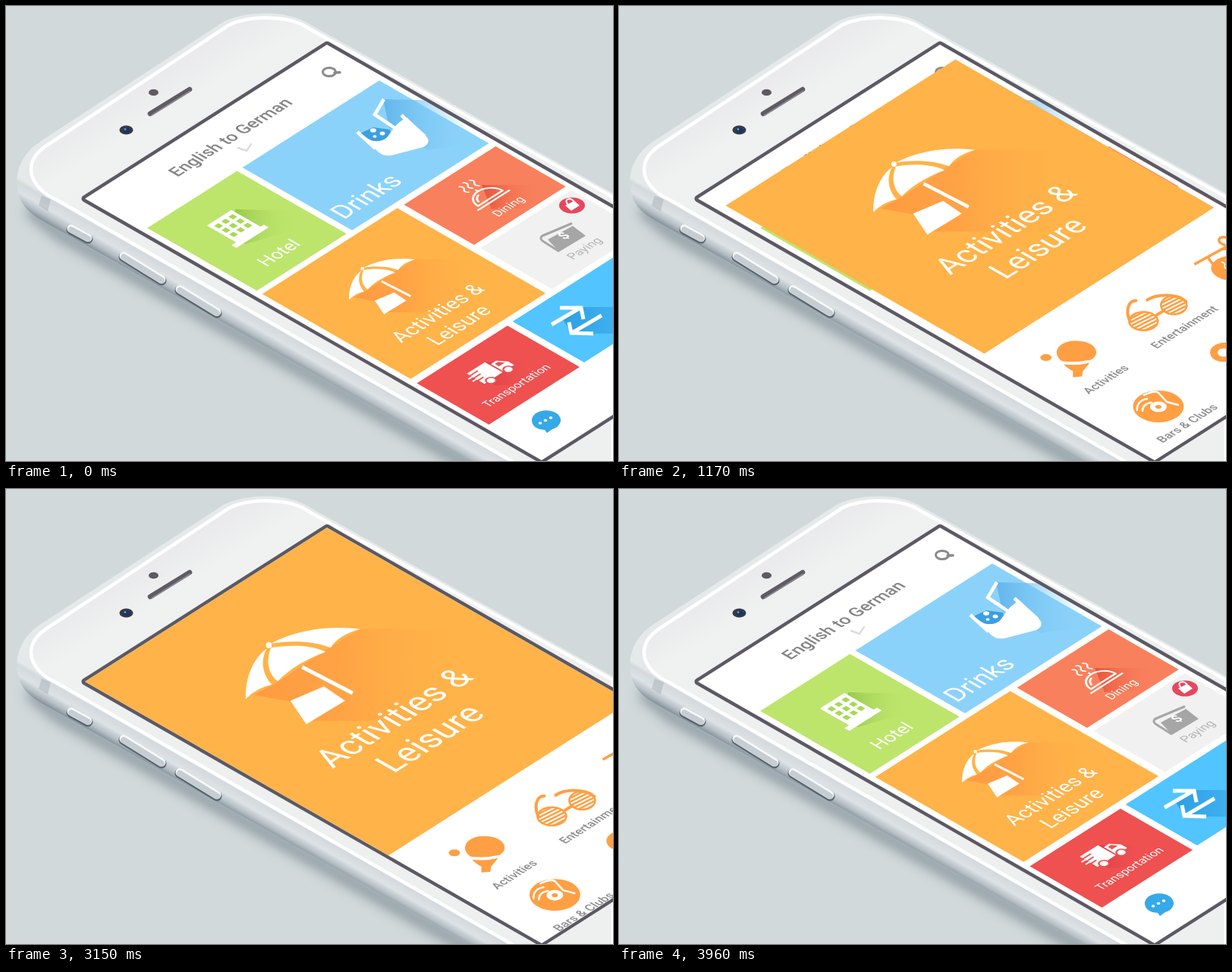
Recreate the animation shown at these times as an HTML page. Size 800 by 600 pixels, loop 4200 ms.

```html
<!DOCTYPE html>
<html lang="en">
<head>
<meta charset="utf-8">
<title>Travel phrasebook</title>
<style>
html, body { margin: 0; width: 100%; height: 100%; overflow: hidden; background: #d1d9da; }
svg { display: block; width: 800px; height: 600px; font-family: Roboto, sans-serif; }
.mid { text-anchor: middle; }
.line { fill: none; stroke-linecap: round; stroke-linejoin: round; }
.cut { fill: none; stroke-linecap: butt; stroke-linejoin: miter; }
.white { fill: #fff; }
.ink { stroke: #fff; }
.amber { fill: #ff9f43; }
.amberLine { stroke: #ff9f43; }
.label { fill: #8c8c8c; font-size: 15.2px; font-weight: 500; }
</style>
</head>
<body>
<svg viewBox="0 0 800 600">
<defs>
  <linearGradient id="side" gradientUnits="userSpaceOnUse" x1="253" y1="399" x2="269" y2="371">
    <stop offset="0" stop-color="#8a969e"/><stop offset=".2" stop-color="#b4bec4"/>
    <stop offset=".5" stop-color="#dde2e5"/><stop offset=".85" stop-color="#d3d9dc"/>
    <stop offset="1" stop-color="#e6e9ea"/>
  </linearGradient>
  <linearGradient id="face" gradientUnits="userSpaceOnUse" x1="180" y1="90" x2="260" y2="220">
    <stop offset="0" stop-color="#e9e9eb"/><stop offset=".4" stop-color="#f0f1f1"/><stop offset="1" stop-color="#eeefef"/>
  </linearGradient>
  <linearGradient id="blueShade"><stop offset="0" stop-color="#62b5ec"/><stop offset="1" stop-color="#8bd2fa" stop-opacity="0"/></linearGradient>
  <linearGradient id="greenShade"><stop offset="0" stop-color="#95c94a"/><stop offset="1" stop-color="#bde56c" stop-opacity="0"/></linearGradient>
  <linearGradient id="redShade"><stop offset="0" stop-color="#e5533d"/><stop offset="1" stop-color="#f9805c" stop-opacity="0"/></linearGradient>
  <linearGradient id="crimsonShade"><stop offset="0" stop-color="#d23c40"/><stop offset="1" stop-color="#ef5050" stop-opacity="0"/></linearGradient>
  <linearGradient id="skyShade"><stop offset="0" stop-color="#2d9fe2"/><stop offset="1" stop-color="#3eb0f0"/></linearGradient>
  <linearGradient id="amberShade"><stop offset="0" stop-color="#ff9a42"/><stop offset=".4" stop-color="#ffa345"/><stop offset="1" stop-color="#ffb348" stop-opacity="0"/></linearGradient>
  <filter id="soft" x="-20%" y="-20%" width="140%" height="140%"><feGaussianBlur stdDeviation="8"/></filter>
  <clipPath id="screen"><path id="glass"/></clipPath>
  <clipPath id="lenses"><ellipse cx="671" cy="404" rx="20" ry="13"/><ellipse cx="711" cy="383" rx="18" ry="13"/></clipPath>
</defs>

<rect width="800" height="600" fill="#d1d9da"/>

<!-- phone -->
<path d="M36 272L70 300 640 622" class="line" stroke="#75848d" stroke-width="18" opacity=".7" filter="url(#soft)"/>
<path d="M800 247L400 24C375 7 325 4 288 20L46 178C17 197 11 224 16 246C20 266 36 277 62 291L800 706Z" fill="url(#side)"/>
<path d="M800 252L398 29C375 13 325 11 294 25L55 183C28 200 27 224 46 242Q54 250 64 254L800 677Z" fill="url(#face)" stroke="#fff" stroke-width="4.500"/>
<path d="M47 250l12 5-4 16-12-8z" fill="#aab2b7" opacity=".5"/>
<g id="buttons" class="line"></g>
<ellipse cx="194.500" cy="114" rx="6.500" ry="4.300" fill="#5e5962"/>
<path d="M190 142L242 110" class="line" stroke="#5f5b64" stroke-width="6.500"/>
<path d="M192 144L243 112" class="line" stroke="#8d8990" stroke-width="1.500"/>
<ellipse cx="158.500" cy="163.500" rx="9" ry="6" fill="#383a45"/>
<ellipse cx="159" cy="164" rx="5" ry="3.500" fill="#18375f"/>
<circle cx="157" cy="162.500" r="1.300" fill="#7aa9d6"/>
<path id="frame" fill="#fff" stroke="#5c5964" stroke-width="9" stroke-linejoin="round"/>

<g clip-path="url(#screen)">
  <rect width="800" height="600" fill="#fff"/>

  <!-- home -->
  <g data-plane>
    <g id="tiles"></g>
    <text x="185.500" y="45.500" class="mid" font-size="22" font-weight="500" fill="#858585">English to German</text>
  </g>
  <g class="line" stroke="#8a8a8a" stroke-width="3">
    <ellipse cx="426" cy="87" rx="8.500" ry="5.500"/><path d="M433 88l7-.5" stroke-width="3.500"/>
    <path d="M306 187l11 4 6-9" stroke="#dcdcdc" stroke-width="2.500"/>
  </g>

  <path d="M497 123L585 125 618 180 556 190 505 160Z" fill="url(#blueShade)"/>
  <path d="M467 168L484 160 506 163 508 172 496 178 482 178Z" fill="#3c9fe2"/>
  <path d="M474 173Q484 181 496 177C507 174 507 158 528 147L555 173Q560 181 550 186L508 197Q496 199 488 190Z" class="white"/>
  <path d="M463 166L487 188M498 123L486 143 514 162M521 144L552 172" class="cut ink" stroke-width="4.500"/>
  <g class="white"><ellipse cx="484" cy="164" rx="4" ry="2.800"/><ellipse cx="496" cy="168" rx="3.500" ry="2.500"/><ellipse cx="486" cy="172" rx="2.500" ry="1.800"/></g>

  <path d="M302 268L372 270 385 294 315 314 300 300Z" fill="url(#greenShade)"/>
  <path d="M627 236L705 236 690 266 640 268Z" fill="url(#redShade)"/>
  <path d="M634 470L680 470 690 498 645 500 625 490Z" fill="url(#crimsonShade)"/>
  <path d="M758 397L800 397 800 432 746 432 733 412Z" fill="url(#skyShade)"/>

  <g data-plane>
    <g class="white">
      <path d="M55 127h38v43h5v7H48v-7h7z"/>
      <g id="windows" fill="#a9d858"></g>
      <path d="M56 508h28v26H56zM86 515h8l8 10v9H86z"/>
      <path d="M89 518h5l4 6h-9z" fill="#ef5050"/>
      <path d="M54 513h13M54 519h11M54 525h9" class="line" stroke="#ef5050" stroke-width="2"/>
      <g stroke="#ef5050" stroke-width="2"><circle cx="65" cy="535" r="5.500"/><circle cx="92" cy="535" r="5.500"/></g>
      <path d="M51 516h8M51 522h8" class="line ink" stroke-width="2"/>
    </g>
    <g class="line ink" stroke-width="2.400">
      <path d="M274 318h48M279 313a19 18 0 0 1 38 0zM298 294v-2M285 308q2-6 8-8"/>
      <path d="M290 289q-4-4 0-7t0-7M298 287q-4-4 0-7t0-7M306 289q-4-4 0-7t0-7" stroke-width="2"/>
    </g>
    <g class="white">
      <text x="163" y="226" font-size="33">Drinks</text>
      <g class="mid">
        <text x="73" y="223.500" font-size="23">Hotel</text>
        <text x="301" y="342" font-size="15.200">Dining</text>
        <text x="77" y="566" font-size="15">Transportation</text>
      </g>
    </g>
    <text x="303" y="452" class="mid" font-size="15.600" fill="#b3b3b3">Paying</text>
  </g>

  <path d="M714 308L747 290 764 303 729 324Z" fill="#a6a6a6"/>
  <path d="M745 287L707 303Q702 307 709 311L728 323" class="line" stroke="#a6a6a6" stroke-width="3"/>
  <g data-plane><text x="304" y="421" class="mid white" font-size="17" font-weight="700">$</text></g>
  <ellipse cx="746" cy="263" rx="17" ry="10.500" fill="#e8465e"/>
  <path d="M737 263L749 257 756 263 745 270Z" class="white"/>
  <path d="M740 261C735 255 743 252 748 257" class="line ink" stroke-width="2"/>
  <path d="M719 420L757 398M730 398L758 398 761 413M785 408L746 431M774 432L745 431 742 417" class="cut ink" stroke-width="5"/>
  <path d="M693 547a19 13 0 1 1 27 11l-7 5-3-4q-16-1-17-12z" fill="#36a9e8"/>
  <g class="white"><ellipse cx="704" cy="550" rx="2.300" ry="1.700"/><ellipse cx="711" cy="546.500" rx="2.300" ry="1.700"/><ellipse cx="718" cy="543" rx="2.300" ry="1.700"/></g>

  <!-- category panel -->
  <g data-plane><rect id="panel" width="375" height="667" fill="#fff"/></g>
  <g id="row1">
    <ellipse cx="542.500" cy="452" rx="7.500" ry="4.500" class="amber"/>
    <path d="M564 457C550 448 556 431 580 430C606 429 617 446 602 455Q583 459 564 457Z" class="amber"/>
    <path d="M566 461Q584 463 600 459Q594 467 591 470L590 477 578 478 578 470Q570 466 566 461Z" class="amber"/>
    <g clip-path="url(#lenses)">
      <rect x="640" y="360" width="100" height="70" class="amber"/>
      <path id="slats" class="ink" stroke-width="2"/>
    </g>
    <path d="M653 404C647 390 651 377 661 377M727 378C715 367 688 368 676 376M688 396L698 390" class="line amberLine" stroke-width="4"/>
    <g class="line amberLine" stroke-width="2.500"><ellipse cx="671" cy="404" rx="19" ry="12"/><ellipse cx="711" cy="383" rx="17" ry="12"/></g>
    <path d="M738 329L800 295M756 320l7 10M775 309q8-2 8 6M779 304q-12-4-7-10 9-3 13 4M786 303q12-8 5-12" class="cut amberLine" stroke-width="3.500"/>
    <ellipse cx="791" cy="334" rx="31" ry="17" class="amber"/>
    <path d="M774 326q5 1 4 5t5 4M780 323q5 1 4 5t5 4M787 320q5 1 4 5t5 4" class="line ink" stroke-width="1.700"/>
    <g class="label"><text data-at="626 483.500" class="mid">Activities</text><text data-at="729.500 414.500" class="mid">Entertainment</text><text data-at="790 375.500">Restaurants</text></g>
  </g>
  <g id="row2">
    <ellipse cx="683" cy="512" rx="33.500" ry="21" class="amber"/>
    <path d="M655 517C654 509 660 503 668 502M662 518C662 512 666 508 674 507M664 497C675 492 680 492 683 494L694 506 709 510" class="line ink" stroke-width="2.500"/>
    <ellipse cx="683" cy="512.500" rx="11" ry="7" class="white"/><ellipse cx="683" cy="512.500" rx="4" ry="2.600" class="amber"/>
    <path d="M751 441C752 427 776 425 785 431Q792 430 800 426V462H788Q788 452 778 452C762 456 752 450 751 441Z" class="amber"/>
    <ellipse cx="769" cy="441" rx="8" ry="5.500" class="white"/>
    <path d="M789 420q6-3 8 1t6 0M794 426q5-2 6 1" class="line amberLine" stroke-width="2"/>
    <g class="label"><text data-at="725.500 537" class="mid">Bars &amp; Clubs</text><text data-at="791 493.500">Beaches</text></g>
  </g>

  <!-- expanding card -->
  <g data-plane><rect id="card" fill="#ffb348"/></g>
  <g id="umbrella">
    <path d="M330 262L359 247 420 206 457 184H592V293H392L374 270Z" fill="url(#amberShade)"/>
    <g class="white">
      <path d="M321 267C320 240 331 218 346 207C338 222 341 238 352 250Q335 253 321 267Z"/>
      <path d="M351 206C345 222 347 236 359 246C372 232 392 220 416 211C400 203 375 202 351 206Z"/>
      <path d="M351 201C385 183 425 180 457 184Q431 191 422 206C402 198 375 197 351 201Z"/>
      <circle cx="348.500" cy="203" r="3.500"/>
      <path d="M374 269L414 252 439 269 393 297Z"/>
    </g>
    <path d="M388 229L448 260" class="cut ink" stroke-width="4.500"/>
  </g>
  <g id="title" class="white mid" font-size="26.300">
    <text x="3">Activities &amp;</text><text x="3" y="31.500">Leisure</text>
  </g>
  <path id="close" d="M-13.500 0H13.500M0-9V9" class="cut ink" stroke-width="4.500"/>
</g>
</svg>
<script>
const LOOP = 4200, STEP = 30;
const AXES = [.8507, -.5413, .897, .514];
const $ = id => document.getElementById(id);
const plane = (x, y) => `matrix(${AXES} ${x} ${y})`;
const set = (el, attrs) => { for (const k in attrs) el.setAttribute(k, attrs[k]); };
const add = (parent, tag, attrs) => {
  const el = document.createElementNS('http://www.w3.org/2000/svg', tag);
  set(el, attrs);
  parent.append(el);
};
const toStage = (x, y) => [104 + x * AXES[0] + y * AXES[2], 254 + x * AXES[1] + y * AXES[3]];

// Static parts
const outline = 'M' + [[0, 0], [375, 0], [375, 671], [0, 671]].map(p => toStage(...p)).join('L') + 'Z';
set($('glass'), { d: outline });
set($('frame'), { d: outline });
document.querySelectorAll('[data-plane]').forEach(el => set(el, { transform: plane(104, 254) }));
document.querySelectorAll('[data-at]').forEach(el => set(el, { transform: plane(...el.dataset.at.split(' ')) }));

[['#bde56c', 8, 84, 139, 161], ['#8bd2fa', 155.5, 84, 212, 161], ['#f9805c', 226.5, 254, 142, 103],
 ['#f1f1f1', 227, 366, 141, 105], ['#ef5050', 7, 481, 140.5, 106], ['#52c4ff', 156.5, 480, 212, 105]]
  .forEach(([fill, x, y, width, height]) => add($('tiles'), 'rect', { fill, x, y, width, height }));

for (let i = 0; i < 9; i++)
  add($('windows'), 'rect', { x: 60 + i % 3 * 11, y: 133 + Math.floor(i / 3) * 11, width: 6.5, height: 7 });

let slats = '';
for (let y = 405; y < 450; y += 5) slats += `M640 ${y}L740 ${y - 50}`;
set($('slats'), { d: slats });

[[86, 294, 108, 306], [155, 330, 205, 361], [229, 374, 278, 404]].forEach(([x1, y1, x2, y2]) => {
  const d = `M${x1} ${y1}L${x2} ${y2}`;
  [['#59656d', 13, 1], ['#f7f9fa', 11, -.5], ['#c6ced3', 8, 1]].forEach(([stroke, width, dy]) =>
    add($('buttons'), 'path', { d, stroke, 'stroke-width': width, transform: `translate(0 ${dy})` }));
});

// time, card x y w h, umbrella x y scale, title x y scale, panel top, row offsets
const HOME = [8, 253, 209, 218, 470, 347, .64, 574, 411, 1, 667, 340, 400];
const OPEN = [0, 0, 375, 388, 349, 204, 1, 507, 300, 1.57, 388, 0, 0];
const POSES = [
  [690, ...HOME],
  [1050, 44, 144, 283, 341.5, 416, 238, .926, 554.5, 325, 1.34, 485.5, 120, 160],
  [1230, ...OPEN],
  [2730, ...OPEN],
  [3150, 0, 0, 375, 446, 347, 207, 1.11, 520, 312, 1.69, 446, 54, 45],
  [3210, 0, 0, 375, 667, 400, 240, 1.06, 560, 345, 1.56, 667, 260, 260],
  [3240, 10, 10, 355, 629, 425, 255, 1, 575, 352, 1.45, 667, 278, 278],
  [3360, 34, 163, 267, 380, 495, 302, .78, 610, 377, 1.12, 667, 340, 400],
  [3630, ...HOME]
];

const rate = (i, c) => (POSES[i + 1][c] - POSES[i][c]) / (POSES[i + 1][0] - POSES[i][0]);

// Monotone slope: flat at the ends and at turning points
function slope(i, c) {
  if (i === 0 || i === POSES.length - 1) return 0;
  const a = rate(i - 1, c), b = rate(i, c);
  if (a * b <= 0) return 0;
  return Math.sign(a) * Math.min(3 * Math.abs(a), 3 * Math.abs(b), Math.abs(a + b) / 2);
}

function poseAt(t) {
  if (t <= POSES[0][0] || t >= POSES.at(-1)[0]) return HOME;
  const i = POSES.findIndex(p => p[0] > t) - 1;
  const from = POSES[i], to = POSES[i + 1], span = to[0] - from[0];
  const s = (t - from[0]) / span, s2 = s * s, s3 = s2 * s;
  return HOME.map((_, k) => {
    const c = k + 1;
    return from[c] * (2 * s3 - 3 * s2 + 1) + to[c] * (3 * s2 - 2 * s3)
      + span * (slope(i, c) * (s3 - 2 * s2 + s) + slope(i + 1, c) * (s3 - s2));
  });
}

function closeAt(t) {
  const appear = Math.max(0, Math.min(1, (t - 1230) / 330));
  const leave = Math.max(0, Math.min(1, (t - 2700) / 240));
  const scale = 1 + 1.7 * (1 - appear) ** 2 + leave;
  return { transform: `translate(162.500 255) scale(${scale})`, opacity: appear * (1 - leave) };
}

function draw(t) {
  const [x, y, width, height, ux, uy, us, tx, ty, ts, top, row1, row2] = poseAt(t);
  set($('card'), { x, y, width, height });
  set($('umbrella'), { transform: `translate(${ux} ${uy}) scale(${us}) translate(-349 -204)` });
  set($('title'), { transform: `${plane(tx, ty)} scale(${ts})` });
  const visibility = top < 666 ? 'visible' : 'hidden';
  set($('panel'), { y: top, visibility });
  [['row1', row1], ['row2', row2]].forEach(([id, d]) =>
    set($(id), { transform: `translate(${d * AXES[2]} ${d * AXES[3]})`, visibility }));
  set($('close'), closeAt(t));
}

const start = performance.now();
function tick() {
  const t = (performance.now() - start) % LOOP;
  draw(Math.floor(t / STEP) * STEP);
  requestAnimationFrame(tick);
}
tick();
</script>
</body>
</html>
```
